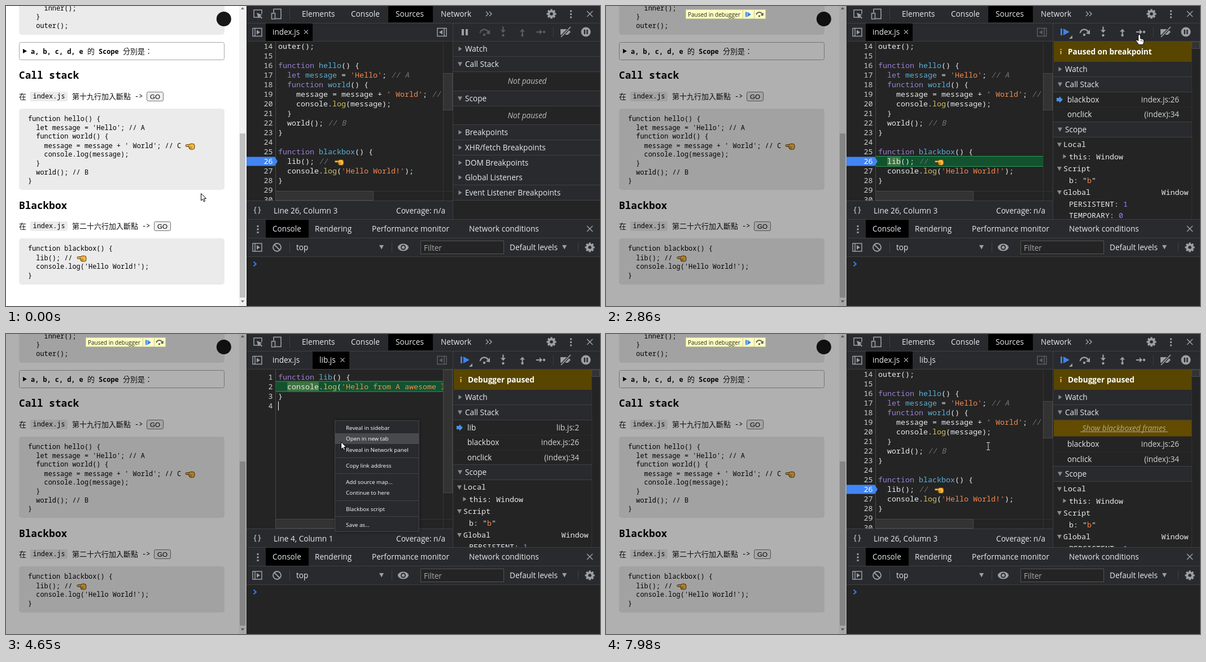
These frames come from a looping animation (1052x532 px, 8 s). An HTML page with a canvas:

```html
<!DOCTYPE html>
<html lang="zh-Hant">
<head>
<meta charset="utf-8">
<title>Debugger walkthrough</title>
<style>
html, body { margin: 0; width: 100%; height: 100%; overflow: hidden; background: #242424; }
canvas { display: block; width: 1052px; height: 532px; }
</style>
</head>
<body>
<canvas id="stage"></canvas>
<script>
const W = 1052, H = 532, LOOP = 8000;
const BG = '#242424', BAR = '#292a2d', LINE = '#3f4043', TEXT = '#e8eaed', ICON = '#9aa0a6', OFF = '#5a5c60';
const OLIVE = '#574500', BLUE = '#3f82e8';
const UI = '"Open Sans", "Noto Sans", sans-serif';
const MONO = '"Noto Sans Mono", "DejaVu Sans Mono", monospace';
const CJK = '"Noto Sans CJK TC", "Noto Sans CJK JP", "Noto Sans CJK", sans-serif';

const canvas = document.getElementById('stage');
const ctx = canvas.getContext('2d');
const dpr = window.devicePixelRatio || 1;
canvas.width = W * dpr;
canvas.height = H * dpr;

// ---- drawing helpers ----
function rect(x, y, w, h, color) { ctx.fillStyle = color; ctx.fillRect(x, y, w, h); }

function round(x, y, w, h, r, fill, stroke) {
  ctx.beginPath();
  ctx.roundRect(x, y, w, h, r);
  if (fill) { ctx.fillStyle = fill; ctx.fill(); }
  if (stroke) { ctx.strokeStyle = stroke; ctx.lineWidth = 1; ctx.stroke(); }
}

function path(points, x, y) {
  ctx.beginPath();
  for (let i = 0; i < points.length; i += 2) ctx.lineTo(x + points[i], y + points[i + 1]);
}

function poly(points, x, y, color) { path(points, x, y); ctx.closePath(); ctx.fillStyle = color; ctx.fill(); }

function line(points, x, y, color, w = 1.5) {
  path(points, x, y);
  ctx.strokeStyle = color;
  ctx.lineWidth = w;
  ctx.stroke();
}

function disc(x, y, r, color) { ctx.beginPath(); ctx.arc(x, y, r, 0, 7); ctx.fillStyle = color; ctx.fill(); }

function ring(x, y, r, color, w = 1.5, from = 0, to = Math.PI * 2) {
  ctx.beginPath();
  ctx.arc(x, y, r, from, to);
  ctx.strokeStyle = color;
  ctx.lineWidth = w;
  ctx.stroke();
}

function text(s, x, y, color, font, align = 'left') {
  ctx.font = font;
  ctx.fillStyle = color;
  ctx.textAlign = align;
  ctx.fillText(s, x, y);
}

function ui(s, x, cy, color = TEXT, style = '', align = 'left', size = 13.6) {
  text(s, x, cy + size * 0.36, color, `${style} ${size}px ${UI}`, align);
}

function mono(s, x, cy, color = TEXT, style = '', align = 'left') {
  text(s, x, cy + 4.8, color, `${style} 13.333px ${MONO}`, align);
}

function clip(x, y, w, h, draw) {
  ctx.save();
  ctx.beginPath();
  ctx.rect(x, y, w, h);
  ctx.clip();
  draw();
  ctx.restore();
}

// ---- icons ----
function cross(x, y, r, color = ICON, w = 1.5) {
  line([-r, -r, r, r], x, y, color, w);
  line([r, -r, -r, r], x, y, color, w);
}

function dots(x, y) { for (const d of [-5.5, 0, 5.5]) disc(x, y + d, 1.7, ICON); }

function gear(x, y) {
  for (let i = 0; i < 8; i++) {
    const a = i * Math.PI / 4, c = Math.cos(a), s = Math.sin(a);
    line([c * 5, s * 5, c * 8.5, s * 8.5], x, y, ICON, 3.4);
  }
  ring(x, y, 4.7, ICON, 3.8);
}

function panel(x, y, color, flip) {
  ctx.strokeStyle = color;
  ctx.lineWidth = 1.5;
  ctx.strokeRect(x - 8, y - 7, 16, 14);
  const k = flip ? -1 : 1;
  line([-4 * k, -7, -4 * k, 7], x, y, color);
  poly([-1 * k, -4, 5 * k, 0, -1 * k, 4], x, y, color);
}

function pauseBars(x, y, color) { rect(x - 5, y - 5, 4, 11, color); rect(x + 2, y - 5, 4, 11, color); }

function stepOver(x, y, color, k = 1) {
  ring(x, y + 2 * k, 7.5 * k, color, 2.4 * k, Math.PI * 1.05, Math.PI * 1.85);
  poly([10 * k, -5 * k, 10 * k, 3 * k, 3 * k, 2 * k], x, y, color);
  disc(x, y + 4 * k, 2.2 * k, color);
}

function stepArrow(x, y, angle, color) {
  ctx.save();
  ctx.translate(x, y);
  ctx.rotate(angle);
  rect(-7, -1, 7, 2.2, color);
  poly([-1, -4.5, 4, 0, -1, 4.5], 0, 0, color);
  ctx.restore();
}

function triangle(x, y, open, color = '#8a8a8a') {
  poly(open ? [-4, -3.5, 4, -3.5, 0, 4] : [-2.5, -4, 3.5, 0, -2.5, 4], x, y, color);
}

function thumbLeft(x, y) {
  ctx.save();
  ctx.translate(x, y);
  round(-8, -3.5, 10, 3.6, 1.8, '#f6b73c', '#553a12');
  round(-2, -5, 10, 10, 3.5, '#f6b73c', '#553a12');
  rect(-2, -2.9, 5, 2.4, '#f6b73c');
  line([-1, 0.8, 3, 0.8], 0, 0, '#8a5a12', 0.8);
  line([-1, 2.8, 3, 2.8], 0, 0, '#8a5a12', 0.8);
  ctx.restore();
}

// ---- web page on the left ----
const HELLO = ['function hello() {', "  let message = 'Hello'; // A", '  function world() {',
  "    message = message + ' World'; // C", '    console.log(message);', '  }', '  world(); // B', '}'];
const BLACKBOX = ['function blackbox() {', '  lib(); //', "  console.log('Hello World!');", '}'];

function pageText(s, x, cy, style = '', size = 11.9) {
  text(s, x, cy + size * 0.34, '#000', `${style} ${size}px ${MONO}`);
}

function pageBlock(lines, y, marked, markX) {
  lines.forEach((s, i) => pageText(s, 39, y + i * 15.6 + (i >= marked ? 0.9 : 0)));
  thumbLeft(markX, y + marked * 15.6 + 2.5);
}

function task(cy, label, arrowX, hover) {
  const font = `13px ${CJK}`;
  text('在', 23, cy + 4.5, '#111', font);
  round(43, cy - 8, 66, 17, 2, '#ebebeb');
  pageText('index.js', 47.5, cy);
  text(label, 117, cy + 4.5, '#111', font);
  pageText('->', arrowX, cy);
  round(arrowX + 21.5, cy - 7.5, 29, 16, 2.5, hover ? '#dcdcdc' : '#efefef', hover ? '#4a4a4a' : '#767676');
  text('GO', arrowX + 36, cy + 4.5, '#000', '11.6px "Liberation Sans", Arial, sans-serif', 'center');
}

function page(t, cur) {
  rect(0, 0, 426, H, '#fff');
  round(23, -20, 364, 71, 5, '#ebebeb');
  pageText('inner();', 67.5, 3.5);
  pageText('}', 53.3, 19);
  pageText('outer();', 53.3, 34.5);
  disc(385.8, 23, 13, '#191717');

  round(23.5, 64.5, 363, 31, 3, '#fff', '#a6a6a6');
  poly([0, -4, 7, 0, 0, 4], 30, 80, '#000');
  pageText('a, b, c, d, e', 44, 81, 'bold');
  text('的', 144, 85, '#111', `13px ${CJK}`);
  pageText('Scope', 164, 81, 'bold');
  text('分別是：', 207, 85, '#111', `13px ${CJK}`);

  pageText('Call stack', 23, 123, 'bold', 17.75);
  task(160, '第十九行加入斷點', 228, false);
  round(23, 182, 364, 144, 5, '#ebebeb');
  pageBlock(HELLO, 200, 3, 326);

  pageText('Blackbox', 23, 354, 'bold', 17.75);
  const hover = t < 1240 && cur.x > 261 && cur.x < 293 && cur.y > 381 && cur.y < 400;
  task(390, '第二十六行加入斷點', 241, hover);
  round(23, 412, 364, 82, 5, '#ebebeb');
  pageBlock(BLACKBOX, 430, 1, 134);

  rect(413, 0, 13, H, '#f1f1f1');
  rect(414, 226, 10, 291, '#c1c1c1');
  poly([-3, 2, 0, -2, 3, 2], 419, 4, '#777');
  poly([-3, -2, 0, 2, 3, -2], 419, 524, '#777');

  if (t < 1240) return;
  rect(0, 0, 426, H, 'rgba(0,0,0,.31)');
  rect(141, 6, 142, 17, '#ffffc2');
  ctx.strokeStyle = '#cfcf9a';
  ctx.lineWidth = 1;
  ctx.strokeRect(141.5, 6.5, 141, 16);
  rect(242, 7, 1, 16, '#c8c89a');
  rect(262, 7, 1, 16, '#c8c89a');
  ui('Paused in debugger', 145, 15, '#222', '', 'left', 10);
  rect(247, 10.5, 2.5, 9, BLUE);
  poly([0, 0, 6.5, 4.5, 0, 9], 250.5, 10.5, BLUE);
  stepOver(271.5, 15, '#555', 0.72);
}

// ---- code editor ----
const FILES = {
  index: ['outer();', ''].concat(HELLO.map(s => s.replace('// C', '//')), '', BLACKBOX, '', ''),
  lib: ['function lib() {', "  console.log('Hello from A awesome library!');", '}', '']
};

function codeLine(s, cy) {
  let col = 0, prev = '';
  for (const tok of s.match(/\/\/.*|'[^']*'|\w+|\s+|./g) || []) {
    let color = TEXT, style = '';
    if (tok.startsWith('//')) { color = '#747474'; style = 'italic'; }
    else if (tok[0] === "'") color = '#f28b54';
    else if (tok === 'function' || tok === 'let') color = '#9a7fd5';
    else if (prev === 'function' || prev === 'let') color = '#5db0d7';
    else if (prev === '.') color = '#d2c057';
    if (tok.trim()) { mono(tok, 482 + col * 8, cy, color, style); prev = tok; }
    col += tok.length;
  }
}

function execLine(cy, tokenW) {
  rect(478, cy - 10, 297, 19, '#12522f');
  rect(478, cy - 10, 297, 1, '#2a9a58');
  rect(478, cy + 8, 297, 1, '#2a9a58');
  rect(498, cy - 8.5, tokenW, 16, '#3d7440');
}

function caretOn(t) {
  if (t < 1240 || (t >= 2940 && t < 3320)) return false;
  const base = [7020, 5320, 4240, 3320, 1240].find((b, i) => t >= [6910, 5270, 4240, 3320, 1240][i]);
  return Math.floor(Math.max(0, t - base) / 500) % 2 === 0;
}

function thumb(x, y, w, h) {
  rect(x, y, w, h, '#333');
  ctx.strokeStyle = '#4a4a4a';
  ctx.lineWidth = 1;
  ctx.strokeRect(x + 0.5, y + 0.5, w - 1, h - 1);
}

function editor(t) {
  const lib = t >= 3320 && t < 6910, boxed = lib && t >= 5270;
  const top = boxed ? 152 : 63;
  const first = lib ? 1 : 14, y0 = lib ? top + 13.5 : 72;
  const lineY = n => y0 + (n - first) * 17;
  const file = lib ? FILES.lib : FILES.index;
  const menu = t >= 4240 && t < 5270;

  rect(426, 63, 365, 282, BG);
  clip(426, top, 365, 345 - top, () => {
    rect(477, top, 1, 282, '#4a4a4a');
    if (lib) execLine(lineY(2), 56);
    else if (t >= 1240 && t < 3320) execLine(lineY(26), 24);
    if (!lib) poly([0, -8, 50, -8, 55, 0, 50, 8, 0, 8], 426, lineY(26) - 0.5, '#4285f4');
    clip(426, top, 349, 282, () => file.forEach((s, i) => {
      const n = first + i;
      mono(String(n), 472.5, lineY(n) - 0.5, !lib && n === 26 ? '#fff' : '#d0d0d0', '', 'right');
      codeLine(s, lineY(n) - 0.5);
    }));
    if (!lib) thumbLeft(590, lineY(26) + 1.5);
    if (caretOn(t)) {
      const cy = lineY(lib ? (menu ? 4 : 2) : 26);
      rect(menu ? 482 : 498, cy - 8, 1, 16, '#fff');
    }
    rect(478, 328, 313, 17, BG);
    rect(478, 328, 313, 1, '#333');
    rect(774, top, 1, 282, '#333');
    thumb(477, 328, lib ? 249 : 174, 17);
    if (lib) thumb(774, top, 17, boxed ? 96 : 219);
    else thumb(774, 119, 17, 66);
  });
  if (boxed) blackboxBar();

  rect(426, 345, 365, 33, BAR);
  rect(426, 345, 365, 1, LINE);
  mono('{}', 437, 361.5, ICON, 'bold');
  const where = !lib ? 'Line 26, Column 3' : menu ? 'Line 4, Column 1' : 'Line 2, Column 3';
  ui(where, 474, 363);
  ui('Coverage: n/a', 778, 363, TEXT, '', 'right');
}

function blackboxBar() {
  rect(426, 63, 365, 89, OLIVE);
  poly([-9, 8, 0, -9, 9, 8], 445, 82, '#f5a623');
  rect(444, 79, 2, 5, '#4a3400');
  rect(444, 86, 2, 2, '#4a3400');
  ui('This script is blackboxed in the', 461, 81, '#fff');
  ui('debugger', 461, 100, '#fff');
  ui('Learn more', 691, 107, '#a8a294');
  rect(691, 113, 73, 1, '#a8a294');
  cross(774, 107, 3, '#8d8468', 1.2);
  round(436, 119, 89, 28, 4, BG);
  round(531, 119, 77, 28, 4, BG);
  ui('Unblackbox', 480.5, 133, TEXT, '600', 'center', 13.2);
  ui('Configure', 569.5, 133, TEXT, '600', 'center', 13.2);
}

// ---- debugger side panel ----
function stepButtons(t) {
  const live = t >= 1240 && !(t >= 2940 && t < 3170);
  const c = live ? ICON : OFF;
  if (live) {
    rect(805, 40, 3, 12, BLUE);
    poly([0, 0, 11, 6, 0, 12], 810, 40, BLUE);
    poly([0, 0, 0, -6, -6, 0], 826, 58, ICON);
  } else pauseBars(812, 46, ICON);
  stepOver(847, 47, c);
  stepArrow(880.5, 43.5, Math.PI / 2, c);
  disc(880.5, 52, 2.2, c);
  stepArrow(914.5, 44.5, -Math.PI / 2, c);
  disc(914.5, 52, 2.2, c);
  stepArrow(946, 46, 0, c);
  disc(953, 46, 2.2, c);
  rect(969, 38, 1, 17, LINE);
  poly([-9, -5, 4, -5, 9, 0, 4, 5, -9, 5], 991, 46, ICON);
  line([-8, 9, 9, -9], 991, 46, BAR, 4.5);
  line([-8, 9, 9, -9], 991, 46, ICON, 1.8);
  disc(1027, 46, 8.5, ICON);
  rect(1023.5, 42, 2.5, 8, BAR);
  rect(1028, 42, 2.5, 8, BAR);
}

function section(label, top, open, w) {
  rect(792, top, w, 26, BAR);
  rect(792, top + 26, w, 1, LINE);
  triangle(804, top + 13, open);
  ui(label, 813, top + 13);
}

function scopeTree(cy) {
  const rows = [[26.5, 'Local', 1], [69, 'Script', 1], [111, 'Global', 1]];
  for (const [d, name] of rows) { triangle(803, cy + d + 0.5, true); mono(name, 810, cy + d); }
  triangle(812, cy + 47.7, false);
  mono('this: Window', 820, cy + 47.7);
  mono('b: "', 820, cy + 90);
  mono('b', 852, cy + 90, '#f28b54');
  mono('"', 860, cy + 90);
  mono('Window', 983.5, cy + 111);
  mono('PERSISTENT:', 820, cy + 132.5);
  mono('1', 916, cy + 132.5, '#9980ff');
  mono('TEMPORARY:', 820, cy + 152);
  mono('0', 908, cy + 152, '#9980ff');
}

function sidePanel(t) {
  rect(792, 63, 260, 315, BG);
  if (t < 1240) {
    section('Watch', 63, false, 260);
    section('Call Stack', 90, true, 260);
    ui('Not paused', 923, 133.5, '#bdbdbd', 'italic', 'center');
    rect(792, 150, 260, 1, LINE);
    section('Scope', 151, true, 260);
    ui('Not paused', 923, 194.5, '#bdbdbd', 'italic', 'center');
    rect(792, 210, 260, 1, LINE);
    ['Breakpoints', 'XHR/fetch Breakpoints', 'DOM Breakpoints', 'Global Listeners', 'Event Listener Breakpoints']
      .forEach((s, i) => section(s, Math.round(211 + i * 26.75), false, 260));
    return;
  }
  const loaded = t >= 3320 ? t >= 3630 : t >= 1700;
  const w = loaded ? 245 : 260;
  rect(793, 63, w - 1, 36, OLIVE);
  rect(804.5, 76, 2.2, 2, '#f5a623');
  rect(804.5, 79.5, 2.2, 6, '#f5a623');
  ui(t < 3170 ? 'Paused on breakpoint' : 'Debugger paused', 818, 81, '#fff', 'bold');
  section('Watch', 99, false, w);
  section('Call Stack', 126, true, w);

  let y = 153;
  const frames = [['blackbox', 'index.js:26'], ['onclick', '(index):34']];
  if (t >= 5420) {
    rect(793, y, w - 1, 28.5, '#634b00');
    ui('Show blackboxed frames', 917.5, 167, '#b3a98a', 'italic', 'center');
    rect(840, 173, 155, 1, '#b3a98a');
    y = 182.3;
  } else {
    if (t >= 3320) frames.unshift(['lib', 'lib.js:2']);
    poly([-5, -3, 0, -3, 0, -6, 6, 0, 0, 6, 0, 3, -5, 3], 803, 166, '#4a90e2');
  }
  for (const [name, place] of frames) {
    ui(name, 817, y + 13.3);
    ui(place, 770 + w, y + 13.3, '#d4d4d4', '', 'right');
    y += 26.3;
    if (place !== '(index):34') rect(792, Math.round(y), w, 1, '#2b2b2b');
  }
  y = Math.round(y);
  rect(792, y - 1, w, 1, LINE);
  section('Scope', y, true, w);
  if (!loaded) return;
  scopeTree(y + 13);
  rect(1037, 63, 15, 315, BG);
  rect(1037, 63, 1, 315, '#333');
  thumb(1037, 63, 15, 13);
}

// ---- toolbars and console ----
function tab(label, x, y, h, box) {
  if (box) rect(box[0], y, box[1] - box[0], h, '#000');
  ui(label, x, y + h / 2, TEXT);
}

function frameBars(t, cur) {
  rect(426, 0, 626, H, BG);
  rect(426, 0, 626, 62, BAR);
  rect(426, 379, 626, 65, BAR);
  for (const y of [30, 62, 378, 411, 444]) rect(426, y, 626, 1, LINE);
  rect(426, 0, 1, H, '#1c1c1c');

  line([4, 6, -7, 6, -7, -7, 7, -7, 7, 0], 446, 14, ICON);
  poly([-2, -2, 8, 2, 4, 3, 8, 7, 6.5, 8.5, 2.5, 4.5, 1, 8], 446, 14, ICON);
  ctx.strokeStyle = ICON;
  ctx.lineWidth = 1.6;
  ctx.strokeRect(474, 5.5, 13, 17);
  rect(469, 12, 8, 12, BAR);
  ctx.strokeRect(470.5, 13, 6, 10);
  rect(502, 5, 1, 19, LINE);
  tab('Elements', 524, 0, 29);
  tab('Console', 611, 0, 29);
  tab('Sources', 690, 0, 29, [677, 756]);
  tab('Network', 770, 0, 29);
  line([-5, -4, -1, 0, -5, 4], 855, 14, ICON);
  line([1, -4, 5, 0, 1, 4], 855, 14, ICON);
  gear(966, 14);
  dots(1000.5, 14.5);
  cross(1034, 14, 5);

  const opened = t >= 3320, lib = opened && t < 6910;
  panel(445, 46.5, ICON);
  tab('index.js', 472, 31, 31, lib ? null : [460, 543]);
  const hoverTab = lib && t > 5820 && cur.y < 63;
  if (!lib || hoverTab) cross(531.5, 46, 3.5, ICON, 1.2);
  if (opened) tab('lib.js', 555, 31, 31, lib ? [543, 608] : null);
  if (lib) cross(596, 46, 3.5, ICON, 1.2);
  panel(772, 46.5, t < 1240 ? ICON : OFF, true);
  stepButtons(t);

  dots(446, 396);
  tab('Console', 472, 379, 32, [460, 536]);
  tab('Rendering', 547, 379, 32);
  tab('Performance monitor', 648, 379, 32);
  tab('Network conditions', 820, 379, 32);
  cross(1034, 395, 5);

  panel(445, 428, ICON);
  ring(480, 428, 7, ICON, 1.8);
  line([-5, -5, 5, 5], 480, 428, ICON, 1.8);
  for (const x of [502, 683, 1013]) rect(x, 418, 1, 19, LINE);
  ui('top', 514, 428);
  triangle(665, 427.5, true, ICON);
  ctx.beginPath();
  ctx.ellipse(703.5, 428, 9.5, 6.5, 0, 0, 7);
  ctx.fillStyle = ICON;
  ctx.fill();
  disc(703.5, 428, 4.5, BAR);
  disc(703.5, 428, 2.6, ICON);
  rect(734, 416, 148, 24, '#555');
  rect(735, 417, 146, 22, BG);
  ui('Filter', 740, 429, '#a8a8a8');
  ui('Default levels', 892, 428);
  triangle(989, 427.5, true, ICON);
  gear(1034, 428);
  line([-2.5, -4, 2, 0, -2.5, 4], 441, 457.5, '#3b82f6', 1.8);
}

// ---- popups ----
const MENU = [[166.5, 'Reveal in sidebar'], [185.5, 'Open in new tab'], [205.5, 'Reveal in Network panel'],
  [233.5, 'Copy link address'], [262, 'Add source map...'], [281.5, 'Continue to here'],
  [310, 'Blackbox script'], [338, 'Save as...']];

function contextMenu(cur) {
  ctx.save();
  ctx.shadowColor = 'rgba(0,0,0,.6)';
  ctx.shadowBlur = 5;
  rect(583, 153, 149, 198, BAR);
  ctx.restore();
  ctx.strokeStyle = '#46474a';
  ctx.lineWidth = 1;
  ctx.strokeRect(582.5, 153.5, 149, 197);
  for (const y of [219, 247, 295, 323]) rect(583, y, 148, 1, '#414246');
  for (const [y, label] of MENU) {
    if (cur.x > 583 && Math.abs(cur.y - y) < 9.7) rect(583, y - 9.5, 148, 19, '#48494d');
    ui(label, 602, y, '#fff', '', 'left', 9.85);
  }
}

function tooltip(alpha) {
  ctx.save();
  ctx.globalAlpha = alpha;
  rect(515, 66, 404, 29, '#2b2b2b');
  ctx.strokeStyle = '#555';
  ctx.lineWidth = 1;
  ctx.strokeRect(515.5, 66.5, 403, 28);
  ui('http://localhost:5000/sources-javascript-debugging/index.js', 525, 81, '#fff', '', 'left', 13.8);
  ctx.restore();
}

function tipAlpha(t) {
  if (t < 6580 || t >= 7060) return 0;
  return t < 6660 ? 0.5 : t < 6760 ? 0.8 : t < 6910 ? 1 : t < 6985 ? 0.6 : 0.3;
}

// ---- pointer: moves of [start, end, steps, ...[progress, x, y]] ----
const MOVES = [
  [370, 1150, 11, [0, 345, 332], [0.45, 303, 366], [0.8, 270, 408], [1, 271, 396]],
  [1700, 2470, 11, [0, 271, 396], [0.25, 420, 330], [0.6, 800, 160], [0.82, 919, 99], [1, 936, 72]],
  [2550, 2940, 6, [0, 936, 72], [0.5, 945, 52], [1, 944, 48]],
  [3630, 4090, 7, [0, 944, 48], [0.5, 735, 105], [1, 582, 152]],
  [4590, 5270, 9, [0, 582, 152], [0.11, 593, 191], [0.7, 620, 304], [1, 625, 309]],
  [5820, 6580, 11, [0, 625, 309], [0.4, 560, 170], [0.75, 506, 58], [1, 500, 43]],
  [7520, 7980, 7, [0, 500, 43], [0.6, 630, 150], [1, 677, 199]]
];

function pointer(t) {
  const m = MOVES.filter(v => t >= v[0]).pop() || MOVES[0];
  const [start, end, steps, ...pts] = m;
  const k = t < start ? 0 : Math.min(steps, Math.floor((t - start) / (end - start) * (steps - 1) + 1e-6) + 1);
  const p = k / steps;
  const i = Math.max(1, pts.findIndex(q => q[0] >= p));
  const a = pts[i - 1], b = pts[i], f = (p - a[0]) / (b[0] - a[0]);
  return { x: a[1] + (b[1] - a[1]) * f, y: a[2] + (b[2] - a[2]) * f };
}

function drawPointer(t, { x, y }) {
  const menu = t >= 4240 && t < 5270;
  const inEditor = x > 478 && x < 775 && y > (t >= 5270 && t < 6910 ? 152 : 63) && y < 328;
  ctx.lineJoin = 'round';
  if (x > 460 && y < 63) {
    const shape = [-2, 1, 0, 0, 2, 1, 2, 7, 6, 8, 8, 10, 8, 14, 6, 18, -1, 18, -6, 11, -5, 9, -2, 11];
    poly(shape, x, y, '#fff');
    path(shape, x, y);
    ctx.closePath();
    ctx.strokeStyle = '#000';
    ctx.lineWidth = 1;
    ctx.stroke();
    line([3, 9, 3, 12], x, y, '#000', 0.8);
    line([5.5, 10, 5.5, 12], x, y, '#000', 0.8);
  } else if (inEditor && !menu) {
    line([-3, -6.5, 3, -6.5], x, y, '#d8d8d8', 1);
    line([0, -6.5, 0, 6.5], x, y, '#d8d8d8', 1);
    line([-3, 6.5, 3, 6.5], x, y, '#d8d8d8', 1);
  } else {
    const shape = [0.5, 0.5, 0.5, 13, 3.4, 10.4, 5.4, 15, 7.4, 14, 5.5, 9.6, 9.5, 9.4];
    poly(shape, x, y, '#fff');
    path(shape, x, y);
    ctx.closePath();
    ctx.strokeStyle = '#000';
    ctx.lineWidth = 1;
    ctx.stroke();
  }
}

function draw(t) {
  const cur = pointer(t);
  ctx.setTransform(dpr, 0, 0, dpr, 0, 0);
  ctx.lineJoin = 'miter';
  page(t, cur);
  frameBars(t, cur);
  editor(t);
  clip(791, 63, 261, 315, () => sidePanel(t));
  rect(791, 31, 1, 347, LINE);
  if (t >= 4240 && t < 5270) contextMenu(cur);
  const alpha = tipAlpha(t);
  if (alpha) tooltip(alpha);
  drawPointer(t, cur);
}

const began = performance.now();
function tick() {
  draw((performance.now() - began) % LOOP);
  requestAnimationFrame(tick);
}
tick();
</script>
</body>
</html>
```
